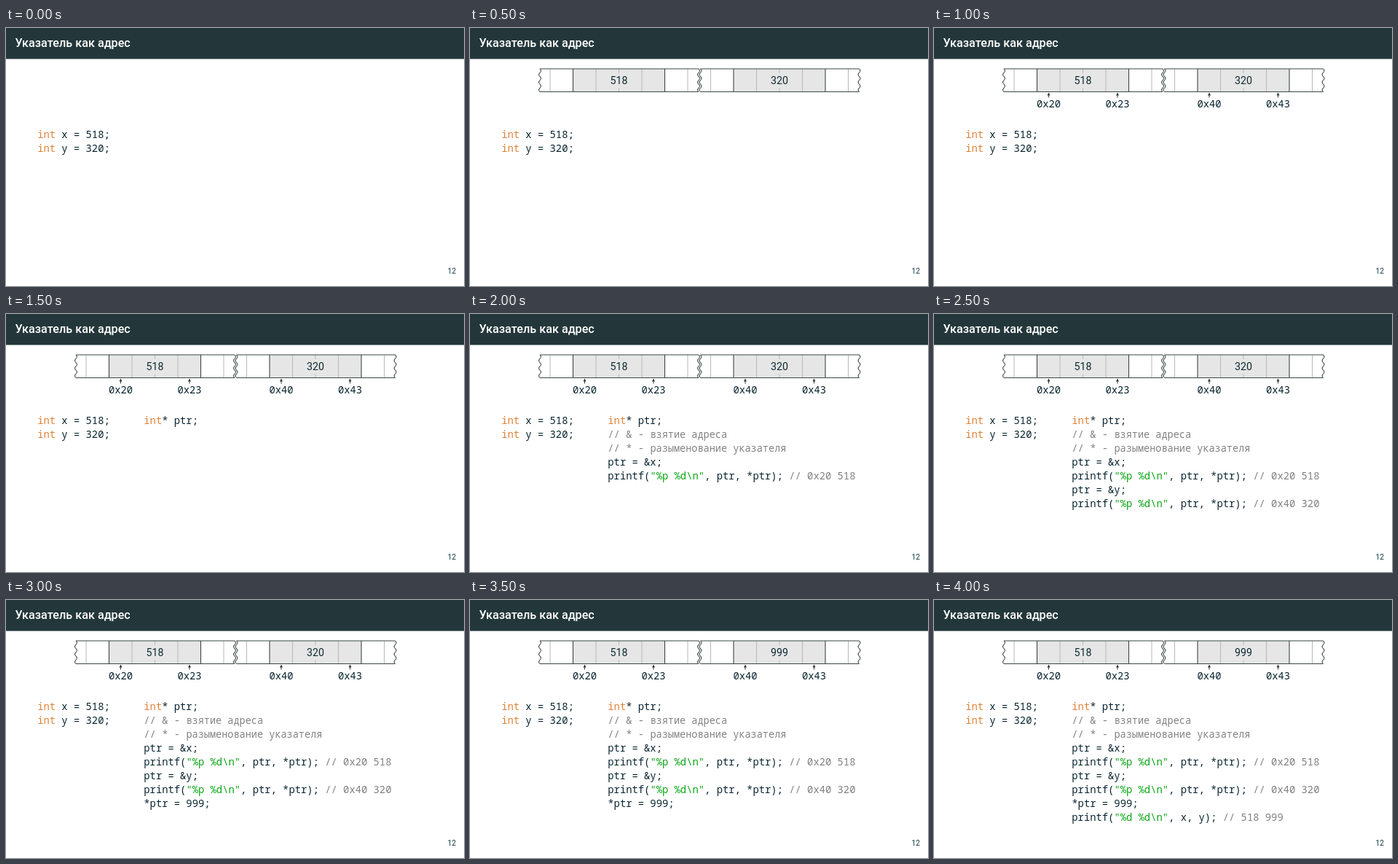
An HTML page for the animation above (4500 ms loop, 629x354 px).

```html
<!DOCTYPE html>
<html lang="ru">
<head>
<meta charset="utf-8">
<title>Указатель как адрес</title>
<style>
  html, body { margin: 0; width: 100%; height: 100%; overflow: hidden; background: #fff; }
  svg { display: block; width: 629px; height: 354px; }
  text { font-family: Roboto, sans-serif; fill: #0e2a32; white-space: pre; }
  .title { font-size: 16.2px; font-weight: 500; fill: #fff; }
  .value { font-size: 14.2px; text-anchor: middle; }
  .page { font-size: 10.3px; fill: #0f3a46; }
  .code { font-family: "Noto Sans Mono", monospace; font-size: 13.83px; font-weight: 500; fill: #0a2630; }
  .address { text-anchor: middle; }
  .cyrillic { font-size: 13.55px; }
  .keyword { fill: #e08238; }
  .string { fill: #0aa514; }
  .comment { fill: #808080; }
  .edge { fill: none; stroke: #3c4648; stroke-width: 1.1; }
  .divider { fill: none; stroke: #b8b8b8; }
  .cell { fill: #e6e6e6; }
</style>
</head>
<body>
<svg id="stage" viewBox="0 0 629 354">
  <rect width="629" height="42.5" fill="#23373b"/>
  <text class="title" x="12.5" y="26">Указатель как адрес</text>
  <text class="page" x="606.5" y="337">12</text>
</svg>
<script>
const LOOP = 4500;
const BYTE = 31.5, TOP = 56, BOTTOM = TOP + BYTE;
const stage = document.getElementById("stage");
const steps = [];

function show(markup, from = 0, until = LOOP) {
  const group = document.createElementNS("http://www.w3.org/2000/svg", "g");
  group.innerHTML = markup;
  group.style.display = from ? "none" : "";
  stage.append(group);
  steps.push({ group, from, until });
}

const path = (kind, d) => `<path class="${kind}" d="${d}"/>`;
const span = (kind, text) => `<tspan class="${kind}">${text}</tspan>`;
const value = (x, text) => `<text class="value" x="${x}" y="77">${text}</text>`;

// Torn edge of a memory strip
function wave(x) {
  let d = "";
  for (let y = TOP; y <= BOTTOM; y += 0.5) {
    const dx = 1.4 * Math.sin((y - TOP) / BYTE * Math.PI * 6);
    d += `${d ? "L" : "M"}${(x + dx).toFixed(2)} ${y}`;
  }
  return path("edge", d);
}

// A strip with one four-byte variable; x is the variable's left side
function memory(x) {
  const left = x - 45.5, right = x + 172.5, end = x + 4 * BYTE;
  const bars = [-1, 1, 3, 5].map(i => `M${x + i * BYTE} ${TOP}V${BOTTOM}`).join("");
  const middle = x + 2 * BYTE;
  const ticks = `M${middle} ${TOP}v6M${middle} ${BOTTOM}v-5`;
  return `<rect class="cell" x="${x}" y="${TOP}" width="${4 * BYTE}" height="${BYTE}"/>`
    + path("divider", bars + ticks)
    + path("edge", `M${left} ${TOP}H${right}M${left} ${BOTTOM}H${right}`
      + `M${x} ${TOP}V${BOTTOM}M${end} ${TOP}V${BOTTOM}`)
    + wave(left) + wave(right);
}

function address(x, text) {
  return `<path d="M${x} 88.5l2 4h-4z" fill="#23373b"/>`
    + path("edge", `M${x} 92V95.5`)
    + `<text class="code address" x="${x}" y="109">${text}</text>`;
}

function code(x, row, source) {
  const colored = source
    .replace(/&/g, "&amp;")
    .replace(/(\bint\b)|("[^"]*")|(\/\/.*)/g, (token, keyword, string) =>
      span(keyword ? "keyword" : string ? "string" : "comment", token))
    .replace(/[а-я][а-я ]*/g, words => span("cyrillic", words));
  return `<text class="code" x="${x}" y="${151 + row * 19}">${colored}</text>`;
}

const listing = (row, ...lines) =>
  lines.map((line, i) => code(189.3, row + i, line)).join("");

show(code(43.2, 0, "int x = 518;") + code(43.2, 1, "int y = 320;"));
show(memory(141.5) + memory(362) + value(204.5, 518), 500);
show(value(425, 320), 500, 3500);
show(address(157.5, "0x20") + address(252, "0x23")
  + address(378, "0x40") + address(472.5, "0x43"), 1000);
show(listing(0, "int* ptr;"), 1500);
show(listing(1,
  "// & - взятие адреса",
  "// * - разыменование указателя",
  "ptr = &x;",
  String.raw`printf("%p %d\n", ptr, *ptr); // 0x20 518`), 2000);
show(listing(5,
  "ptr = &y;",
  String.raw`printf("%p %d\n", ptr, *ptr); // 0x40 320`), 2500);
show(listing(7, "*ptr = 999;"), 3000);
show(value(425, 999), 3500);
show(listing(8, String.raw`printf("%d %d\n", x, y); // 518 999`), 4000);

function draw() {
  const time = performance.now() % LOOP;
  for (const { group, from, until } of steps) {
    group.style.display = time >= from && time < until ? "" : "none";
  }
  requestAnimationFrame(draw);
}
draw();
</script>
</body>
</html>
```
